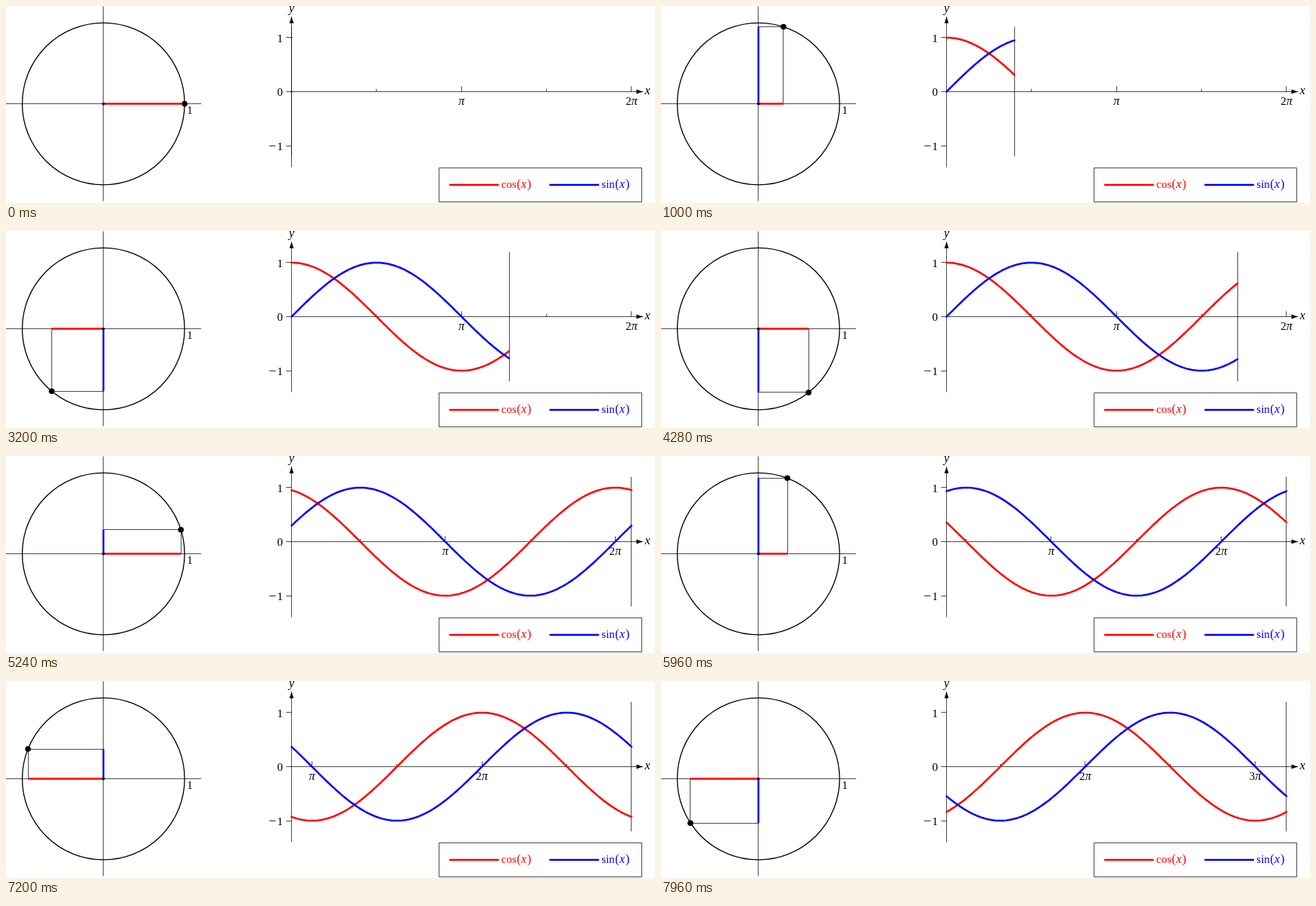
Recreate the animation shown at these times as an HTML page with a canvas. Size 858 by 261 pixels, loop 8 s.

```html
<!DOCTYPE html>
<html lang="en">
<head>
<meta charset="utf-8">
<title>Sine and cosine on the unit circle</title>
<style>
  html, body { margin: 0; width: 100%; height: 100%; overflow: hidden; background: #fff; }
  canvas { display: block; width: 858px; height: 261px; }
</style>
</head>
<body>
<canvas id="stage" width="858" height="261"></canvas>
<script>
const ctx = document.getElementById('stage').getContext('2d');
const TAU = 2 * Math.PI;
const LOOP = 8000, STEP = 40, STEPS_PER_TURN = 125;
const RED = '#f00', BLUE = '#00f', BLACK = '#000';
const SERIF = '"Liberation Serif", serif';

const circle = { x: 128.8, y: 129.6, r: 107.3 };
const plot = { x: 377.5, y: 113.5, unit: 71.54 };
const plotRight = plot.x + TAU * plot.unit;

const snap = v => Math.floor(v) + 0.5;

function stroke(color, width, cap = 'butt') {
  ctx.strokeStyle = color;
  ctx.lineWidth = width;
  ctx.lineCap = cap;
  ctx.lineJoin = 'round';
  ctx.stroke();
}

function line(x1, y1, x2, y2, color = BLACK, width = 0.7, cap) {
  ctx.beginPath();
  ctx.moveTo(x1, y1);
  ctx.lineTo(x2, y2);
  stroke(color, width, cap);
}

const hair = (x1, y1, x2, y2) =>
  x1 === x2 ? line(snap(x1), y1, snap(x1), y2) : line(x1, snap(y1), x2, snap(y1));

function dot(x, y, r) {
  ctx.beginPath();
  ctx.arc(x, y, r, 0, TAU);
  ctx.fillStyle = BLACK;
  ctx.fill();
}

function text(s, x, y, { size = 15, italic = false, align = 'left', color = BLACK } = {}) {
  ctx.font = `${italic ? 'italic ' : ''}${size}px ${SERIF}`;
  ctx.textAlign = align;
  ctx.fillStyle = color;
  ctx.fillText(s, x, y);
}

function arrowHead(x, y, angle) {
  ctx.save();
  ctx.translate(x, y);
  ctx.rotate(angle);
  ctx.beginPath();
  ctx.moveTo(0, 0);
  ctx.quadraticCurveTo(-5, 0.9, -9.5, 2.9);
  ctx.lineTo(-9.5, -2.9);
  ctx.quadraticCurveTo(-5, -0.9, 0, 0);
  ctx.fillStyle = BLACK;
  ctx.fill();
  ctx.restore();
}

function drawCircle(angle) {
  const { x, y, r } = circle;
  const px = x + r * Math.cos(angle), py = y - r * Math.sin(angle);
  hair(0, y, 258, y);
  hair(x, 0.5, x, 258.5);
  ctx.beginPath();
  ctx.arc(x, y, r, 0, TAU);
  stroke(BLACK, 1.3);
  text('1', 243, 143, { align: 'center' });

  hair(px, y, px, py);
  hair(x, py, px, py);
  line(x, y, px, y, RED, 2.5);
  line(x, y, x, py, BLUE, 2.5);
  dot(x, y, 1.9);
  dot(px, py, 3.8);
}

function drawAxes() {
  const { x, y, unit } = plot;
  hair(x - 7.2, y, 835, y);
  arrowHead(843, y, 0);
  hair(x, 213.5, x, 20);
  arrowHead(x, 13.3, -Math.PI / 2);
  for (const v of [1, -1]) hair(x - 7.2, y - v * unit, x, y - v * unit);
  text('x', 844.5, 117, { italic: true, size: 16 });
  text('y', x, 7.5, { italic: true, size: 16, align: 'center' });
  text('1', 366, 47.5, { align: 'right' });
  text('0', 366, 119, { align: 'right' });
  text('1', 366, 190.5, { align: 'right' });
  text('−', 347.3, 191, { size: 18 });
}

function piLabel(n, x) {
  const digit = n > 1 ? String(n) : '';
  const w = digit ? 7.5 : 0;
  text(digit, x - 4.1 - w / 2, 131.3);
  text('π', x + w / 2, 131.3, { italic: true, size: 16, align: 'center' });
}

function drawTicks(start) {
  for (let k = 1; k <= 7; k++) {
    const offset = k * Math.PI / 2 - start;
    if (offset < -1e-6 || offset > TAU + 1e-6) continue;
    const x = plot.x + offset * plot.unit;
    const major = k % 2 === 0;
    hair(x, plot.y, x, plot.y - (major ? 7.2 : 3.6));
    if (major) piLabel(k / 2, x);
  }
}

function drawCurve(fn, start, end, color) {
  const n = 160, span = Math.max(end - start, 1e-4);
  ctx.beginPath();
  for (let i = 0; i <= n; i++) {
    const d = span * i / n;
    ctx.lineTo(plot.x + d * plot.unit, plot.y - plot.unit * fn(start + d));
  }
  stroke(color, 2.5, 'round');
}

function legendEntry(name, x, color) {
  line(x, 237, x + 63.5, 237, color, 2.5, 'round');
  const tx = x + 67.8, y = 241.3;
  text(name, tx, y, { color });
  const after = tx + ctx.measureText(name).width + 0.5;
  text('(', after, y, { color, size: 16 });
  text('x', after + 5.7, y, { color, italic: true, size: 16 });
  text(')', after + 13.7, y, { color, size: 16 });
}

function drawLegend() {
  ctx.beginPath();
  ctx.rect(572.5, 214.5, 268, 45);
  stroke(BLACK, 0.7);
  legendEntry('cos', 587, RED);
  legendEntry('sin', 719.5, BLUE);
}

function draw(time) {
  const angle = Math.floor((time % LOOP) / STEP) / STEPS_PER_TURN * TAU;
  const start = Math.max(0, angle - TAU);
  const sweepX = Math.min(plot.x + angle * plot.unit, plotRight);

  ctx.fillStyle = '#fff';
  ctx.fillRect(0, 0, 858, 261);
  drawCircle(angle);
  drawAxes();
  drawTicks(start);
  hair(sweepX, plot.y - 1.2 * plot.unit, sweepX, plot.y + 1.2 * plot.unit);
  drawCurve(Math.cos, start, angle, RED);
  drawCurve(Math.sin, start, angle, BLUE);
  drawLegend();
}

const begin = performance.now();
function tick() {
  draw(performance.now() - begin);
  requestAnimationFrame(tick);
}
tick();
</script>
</body>
</html>
```
